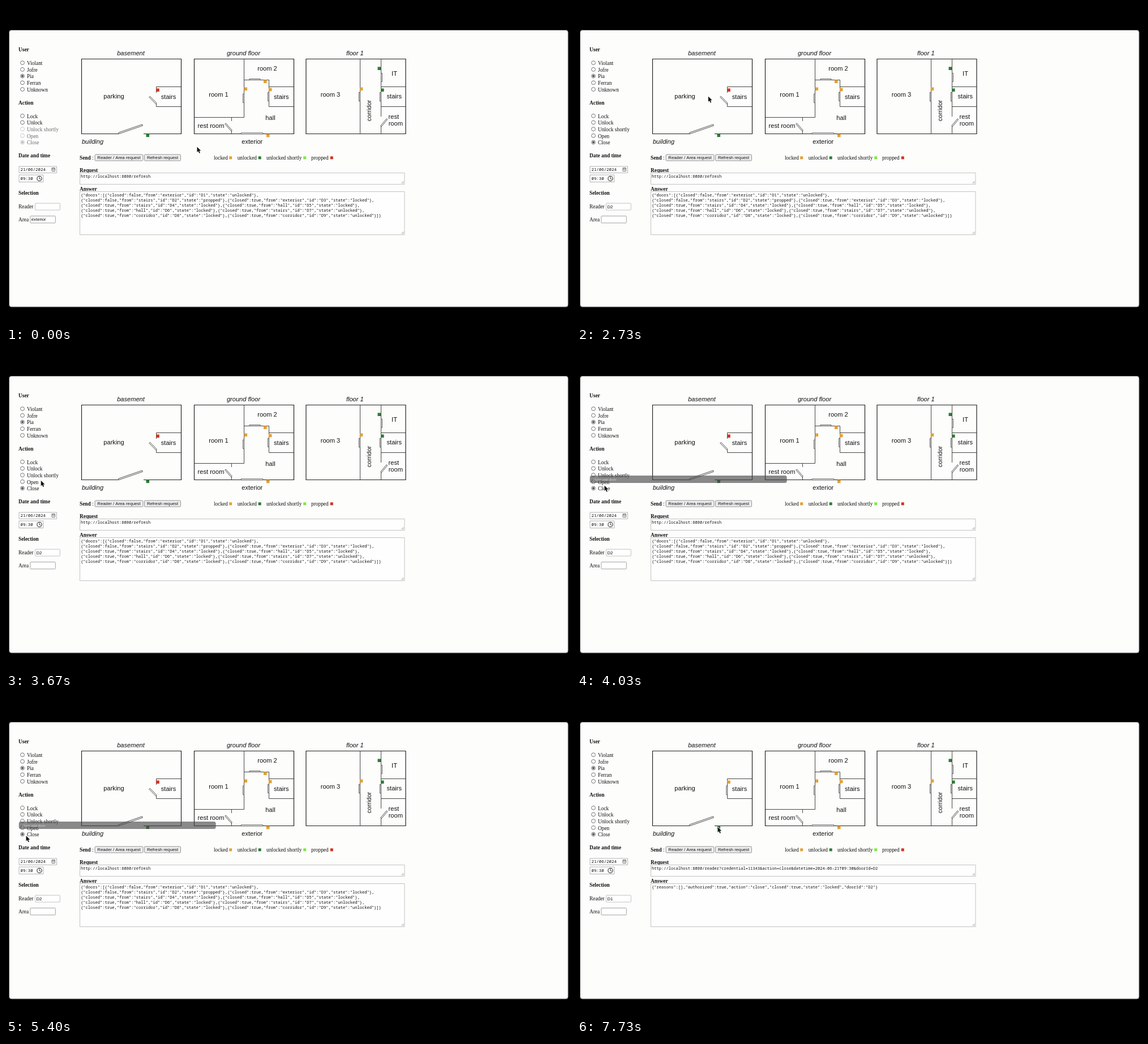
An HTML page with a canvas that plays this animation: 998x561 px, repeating every 8000 ms.

```html
<!DOCTYPE html>
<html lang="en">
<head>
<meta charset="utf-8">
<title>Door control simulator</title>
<style>
html, body { margin: 0; width: 100%; height: 100%; overflow: hidden; background: #000; }
canvas { display: block; }
</style>
</head>
<body>
<canvas id="stage" width="998" height="561"></canvas>
<script>
const ctx = document.getElementById('stage').getContext('2d');
const LOOP = 8000;
const CLICK = 2385, RESPONSE = 6640, RESELECT = 7700;

const SERIF = '9.35px "Liberation Serif", serif';
const BOLD = 'bold ' + SERIF;
const SANS = '11.1px "Liberation Sans", sans-serif';
const UI = '7.75px "Liberation Sans", sans-serif';
const MONO = '7.09px "Noto Sans Mono", monospace';
const CLOCK = '7.4px "Noto Sans Mono", monospace';
const TIP = '7.03px "Liberation Serif", serif';

const INK = '#111', GREY = '#6c6c6c', ORANGE = '#e3a035', GREEN = '#2f7a35', LIME = '#7fe840', RED = '#cf3420';

// Cursor stops: time, x, y
const PATH = [
  [0, 337.5, 248.5], [670, 337.5, 248.5], [1330, 274.5, 145.5], [1400, 273, 145],
  [1500, 273, 145], [1630, 266, 143], [1870, 266, 143], [2070, 267, 146],
  [2570, 267, 146], [3170, 69, 222], [3370, 66, 224], [3500, 66, 224],
  [4030, 48.5, 235.5], [4330, 46, 237], [5130, 35.5, 243], [5450, 35.5, 243],
  [5970, 198, 265], [6270, 187, 268.5], [7000, 187, 268.5], [7370, 248.5, 227.5]
];

const USERS = ['Violant', 'Jofre', 'Pia', 'Ferran', 'Unknown'];
const ACTIONS = ['Lock', 'Unlock', 'Unlock shortly', 'Open', 'Close'];

const door = (closed, from, id, state) =>
  `{"closed":${closed},"from":"${from}","id":"${id}","state":"${state}"}`;
const STATUS = [
  '{"doors":[' + door(false, 'exterior', 'D1', 'unlocked') + ',',
  door(false, 'stairs', 'D2', 'propped') + ',' + door(true, 'exterior', 'D3', 'locked') + ',',
  door(true, 'stairs', 'D4', 'locked') + ',' + door(true, 'hall', 'D5', 'locked') + ',',
  door(true, 'hall', 'D6', 'locked') + ',' + door(true, 'stairs', 'D7', 'unlocked') + ',',
  door(true, 'corridor', 'D8', 'locked') + ',' + door(true, 'corridor', 'D9', 'unlocked') + ']}'
];
const REPLY = ['{"reasons":[],"authorized":true,"action":"close","closed":true,"state":"locked","doorId":"D2"}'];
const SHORTLY_TIP = [
  'Enters the Unlocked Shortly state from Locked. Returns automatically to Locked after 10 seconds if the door is closed',
  'If it is open, it enters state Propped and goes back automatically to Locked only when the door is closed.',
  'In order to check if the door has entered the Propped state or has returned to Locked, both from Propped or',
  'Unlocked Shortly, you have to press the Refresh button .'
];

const clamp = v => Math.max(0, Math.min(1, v));
const ease = v => v * v * (3 - 2 * v);
const fade = (t, a, b, c, d) => Math.min(clamp((t - a) / (b - a)), clamp((d - t) / (d - c)));

function text(s, x, y, font = SERIF, color = INK, align = 'left') {
  ctx.font = font;
  ctx.fillStyle = color;
  ctx.textAlign = align;
  ctx.fillText(s, x, y);
}

function label(s, x, y, style = '') {
  text(s, x, y + 4, style + SANS, '#111', 'center');
}

function line(pts, width = 0.9, color = '#333') {
  ctx.beginPath();
  for (let i = 0; i < pts.length; i += 2) ctx.lineTo(pts[i], pts[i + 1]);
  ctx.lineWidth = width;
  ctx.strokeStyle = color;
  ctx.stroke();
}

function box(x, y, w, h, fill, stroke, r = 0, lw = 0.9) {
  ctx.beginPath();
  ctx.roundRect(x, y, w, h, r);
  if (fill) { ctx.fillStyle = fill; ctx.fill(); }
  if (stroke) { ctx.lineWidth = lw; ctx.strokeStyle = stroke; ctx.stroke(); }
}

function dot(x, y, color) {
  box(x - 2.8, y - 2.8, 5.6, 5.6, color);
}

function shutDoor(x, y, w, h) {
  box(x, y, w, h, '#eee', '#444', 0, 0.8);
}

function openDoor(x1, y1, x2, y2, w) {
  const a = Math.atan2(y2 - y1, x2 - x1);
  ctx.save();
  ctx.translate(x1, y1);
  ctx.rotate(a);
  shutDoor(0, -w / 2, Math.hypot(x2 - x1, y2 - y1), w);
  ctx.restore();
}

function radio(x, y, on, enabled) {
  const c = enabled ? '#555' : '#bbb';
  ctx.beginPath();
  ctx.arc(x, y, 3.4, 0, 7);
  ctx.fillStyle = '#fff';
  ctx.fill();
  ctx.lineWidth = 0.8;
  ctx.strokeStyle = c;
  ctx.stroke();
  if (on) {
    ctx.beginPath();
    ctx.arc(x, y, 2.1, 0, 7);
    ctx.fillStyle = c;
    ctx.fill();
  }
}

function button(s, x, w, hover) {
  box(x, 262, w, 11, hover ? '#d9d9de' : '#ededef', '#888', 1.5);
  text(s, x + w / 2, 270.3, UI, '#111', 'center');
}

function area(y, h, lines) {
  box(130.5, y, 573.5, h, '#fefefe', '#bdbdbd', 0, 0.9);
  const b = y + h;
  line([698.5, b - 1.5, 702.5, b - 5.5], 0.7, '#666');
  line([701, b - 1.5, 702.5, b - 3], 0.7, '#666');
  lines.forEach((s, i) => text(s, 132, y + 8.7 + i * 8.85, MONO));
}

function basement(closed) {
  label('basement', 220.5, 82.5, 'italic ');
  label('building', 153, 239, 'italic ');
  line([199, 225.5, 133.5, 225.5, 133.5, 93.5, 309.5, 93.5, 309.5, 225.5, 243, 225.5], 1.2, '#222');
  openDoor(199, 224.5, 241, 210, 2.4);
  line([309, 142.5, 265.5, 142.5, 265.5, 153]);
  line([265.5, 172, 265.5, 177.5, 309, 177.5]);
  if (closed) {
    line([265.5, 152, 265.5, 173]);
    shutDoor(263.8, 155, 2, 15.5);
  } else {
    openDoor(265.3, 172, 253.5, 160, 2.2);
  }
  label('parking', 190.5, 158.5);
  label('stairs', 287, 159.5);
  dot(268, 148.3, closed ? ORANGE : RED);
  dot(250.3, 228.3, GREEN);
}

function groundFloor() {
  label('ground floor', 419.5, 82.5, 'italic ');
  box(332.5, 93.5, 176, 132, null, '#222', 0, 1.2);
  line([420.5, 93.5, 420.5, 196.5, 332.5, 196.5]);
  line([398.5, 196.5, 398.5, 203]);
  line([398.5, 219, 398.5, 225.5]);
  openDoor(398.5, 220, 387.5, 207.5, 2.2);
  line([420.5, 130.5, 464.5, 130.5, 464.5, 177.5, 508.5, 177.5]);
  line([464.5, 142.5, 508.5, 142.5]);
  shutDoor(430, 128.5, 19, 2);
  shutDoor(418.5, 155, 2, 15.5);
  shutDoor(462.5, 152.5, 2, 15);
  shutDoor(415, 223.8, 39, 2.2);
  label('room 1', 375.5, 156);
  label('room 2', 461.5, 110.3);
  label('stairs', 486.3, 160);
  label('hall', 467, 197);
  label('rest room', 362, 210.5);
  label('exterior', 434.8, 239);
  dot(423.3, 146.3, ORANGE);
  dot(457.8, 133.2, ORANGE);
  dot(466.7, 147.5, ORANGE);
  dot(462.7, 228.5, ORANGE);
}

function firstFloor() {
  label('floor 1', 616.3, 82.5, 'italic ');
  box(530, 93.5, 176, 132, null, '#222', 0, 1.2);
  line([625.5, 93.5, 625.5, 225.5]);
  line([662.5, 93.5, 662.5, 195]);
  line([662.5, 211, 662.5, 225.5]);
  line([662.5, 142.5, 706, 142.5]);
  line([662.5, 177.5, 706, 177.5]);
  openDoor(662.5, 212, 673, 199.5, 2.2);
  shutDoor(623.3, 152.5, 2, 15.5);
  shutDoor(662.5, 118.5, 2, 15);
  shutDoor(660.3, 152.5, 2, 15.5);
  label('room 3', 573, 156.3);
  label('IT', 686, 118.5);
  label('stairs', 685.8, 158.5);
  label('rest', 684.8, 195);
  label('room', 688.3, 207);
  ctx.save();
  ctx.translate(641, 184.5);
  ctx.rotate(-Math.PI / 2);
  label('corridor', 0, 0);
  ctx.restore();
  dot(627.5, 146.3, ORANGE);
  dot(659.3, 110.2, GREEN);
  dot(664.8, 148.3, GREEN);
}

function sidebar(t) {
  const picked = t >= CLICK;
  text('User', 22, 80, BOLD);
  USERS.forEach((s, i) => {
    radio(29, 100.2 + i * 11.7, i === 2, true);
    text(s, 37, 104 + i * 11.7);
  });
  text('Action', 22, 173.6, BOLD);
  ACTIONS.forEach((s, i) => {
    const enabled = picked || i < 2;
    radio(29, 193.8 + i * 11.65, i === 4, enabled);
    text(s, 37, 197.5 + i * 11.7, SERIF, enabled ? INK : GREY);
  });
  text('Date and time', 22, 267.2, BOLD);
  box(23, 283, 66.5, 11.3, '#fff', '#aaa');
  text('21/06/2024', 25.5, 291.4, CLOCK);
  box(81, 285.5, 5.5, 6, null, '#555', 0.5, 0.8);
  line([81, 287.3, 86.5, 287.3], 1, '#555');
  line([82.5, 289.3, 85, 289.3], 0.8, '#777');
  box(23, 298, 42.8, 12.5, '#fff', '#aaa');
  text('09:30', 25.5, 306.9, CLOCK);
  ctx.beginPath();
  ctx.arc(59, 304.4, 4.1, 0, 7);
  ctx.lineWidth = 1;
  ctx.strokeStyle = INK;
  ctx.stroke();
  line([59, 301.5, 59, 304.6, 61.3, 305.6], 0.9, INK);
  text('Selection', 22, 333.2, BOLD);
  text('Reader', 22, 356.7);
  box(51.5, 348, 43.8, 12, '#fff', '#bbb', 1);
  if (picked) text(t >= RESELECT ? 'D1' : 'D2', 53.5, 356.5, UI);
  text('Area', 22, 380);
  box(42.8, 370.5, 44.5, 12.3, '#fff', '#999', 1);
  if (!picked) text('exterior', 44.8, 379.3, UI);
}

function requestPanel(t) {
  const done = t >= RESPONSE;
  text('Send', 130, 270.5, BOLD);
  text(':', 152, 270.5);
  button('Reader / Area request', 157, 85, t >= 5930 && t < 7170);
  button('Refresh request', 244.5, 64, false);
  [['locked', 367, 396.7, ORANGE], ['unlocked', 408.7, 448.2, GREEN],
   ['unlocked shortly', 460, 527.7, LIME], ['propped', 539, 575.3, RED]]
    .forEach(([s, x, dx, c]) => {
      text(s, x, 270.5);
      box(dx - 2.5, 265.3, 5, 5, c);
    });
  text('Request', 130, 292.8, BOLD);
  area(294.5, 20, ['http://localhost:8080/' +
    (done ? 'reader?credential=11343&action=close&datetime=2024-06-21T09:30&doorId=D2' : 'refresh')]);
  text('Answer', 130, 325.8, BOLD);
  area(327.5, 76, done ? REPLY : STATUS);
}

function tooltip(x, y, h, lines, alpha) {
  if (!alpha) return;
  ctx.globalAlpha = alpha * 0.97;
  box(x, y, 348, h, '#4a4a4a', null, 3.5);
  lines.forEach((s, i) => text(s, x + 6, y + 9.3 + i * 8.4, (i > 1 ? 'bold ' : '') + TIP, '#fff'));
  ctx.globalAlpha = 1;
}

function cursor(t) {
  let i = PATH.length - 1;
  while (PATH[i][0] > t) i--;
  const [t0, x0, y0] = PATH[i];
  const [t1, x1, y1] = PATH[i + 1] || [LOOP, x0, y0];
  const k = ease((t - t0) / (t1 - t0));
  ctx.save();
  ctx.translate(x0 + (x1 - x0) * k, y0 + (y1 - y0) * k);
  ctx.scale(0.9, 0.9);
  ctx.beginPath();
  [[0, 0], [0, 10.6], [2.4, 8.4], [4.2, 12.4], [6, 11.6], [4.3, 7.7], [7.5, 7.5]]
    .forEach(p => ctx.lineTo(...p));
  ctx.closePath();
  ctx.lineJoin = 'round';
  ctx.lineWidth = 1.4;
  ctx.strokeStyle = '#fff';
  ctx.stroke();
  ctx.fillStyle = '#111';
  ctx.fill();
  ctx.restore();
}

function draw(t) {
  ctx.fillStyle = '#000';
  ctx.fillRect(0, 0, 998, 561);
  box(5.5, 42.5, 987.5, 488.5, '#fdfdfc', '#555', 4, 1);
  sidebar(t);
  basement(t >= RESPONSE);
  groundFloor();
  firstFloor();
  requestPanel(t);
  tooltip(39.5, 169.5, 38.5, SHORTLY_TIP, fade(t, 2820, 3090, 3190, 3370));
  tooltip(22.7, 218, 13, ['close one door'], fade(t, 3830, 4130, 5300, 5600));
  cursor(t);
}

const start = performance.now();
function tick() {
  draw((performance.now() - start) % LOOP);
  requestAnimationFrame(tick);
}
tick();
</script>
</body>
</html>
```
